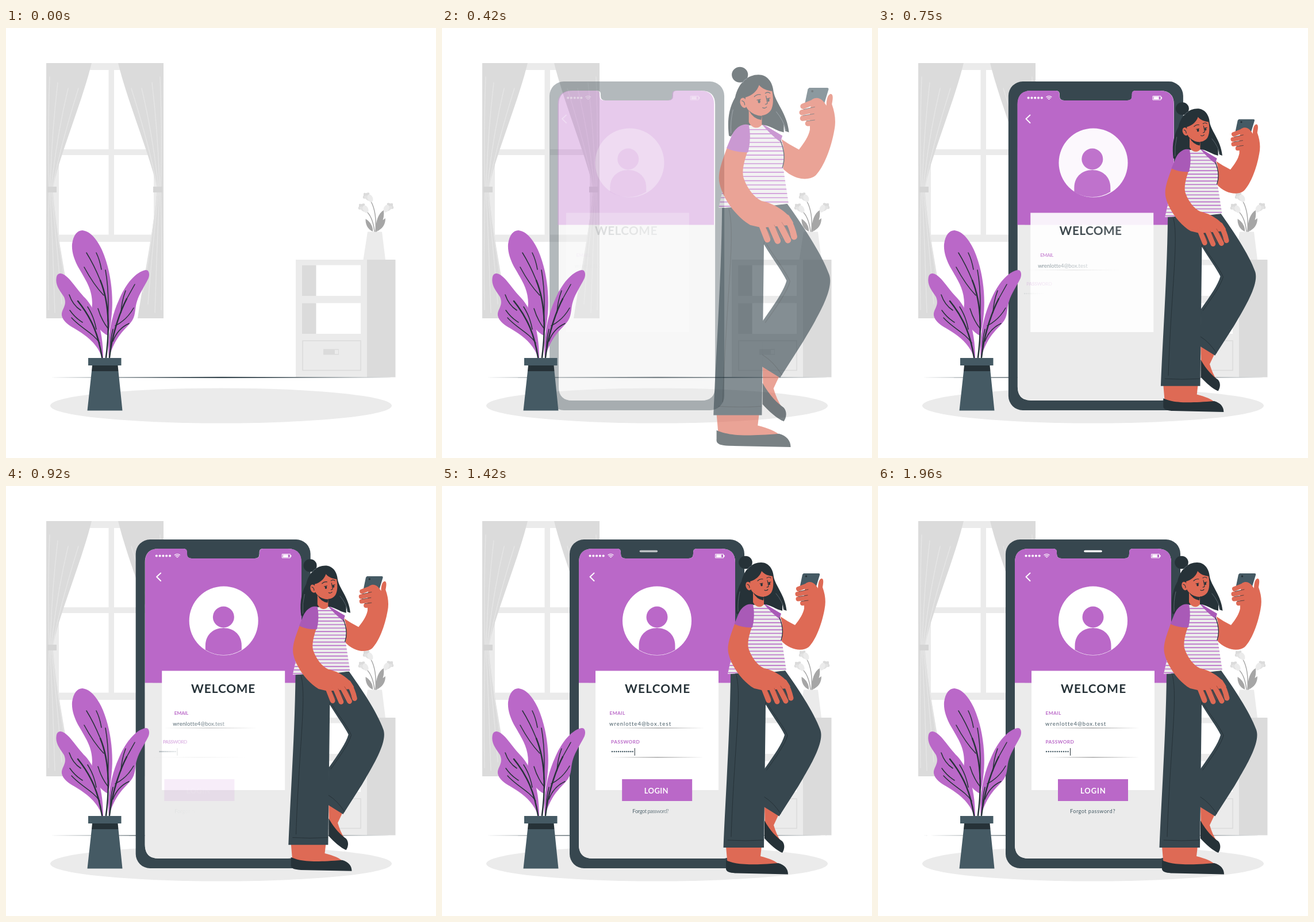
An HTML page that plays this animation: 748x748 px, repeating every 2000 ms.

```html
<!DOCTYPE html>
<html lang="en">
<head>
<meta charset="utf-8">
<title>Login illustration</title>
<style>
html, body { margin: 0; width: 100%; height: 100%; overflow: hidden; background: #fff; }
svg { display: block; width: 100vw; height: 100vh; }
text { font-family: Lato, "Open Sans", sans-serif; white-space: pre; }
.line { fill: none; stroke-linecap: round; stroke-linejoin: round; }
</style>
</head>
<body>
<svg id="stage" viewBox="0 0 748 748">
  <defs>
    <g id="curtain">
      <path fill="#dbdbdb" d="M70 61H149C132 130 92 225 82 276V286C86 340 98 400 115 505H70Z"/>
      <path class="line" stroke="#e6e6e6" stroke-width="1.3" d="M76 85Q72 190 75 276M90 95Q79 190 77 276M108 105Q88 190 79 276M126 105Q96 200 81 276M75 286Q72 390 74 490M77 286Q82 390 85 495M79 286Q90 390 97 480M81 286Q90 370 106 460"/>
      <rect x="72" y="276" width="16" height="10" fill="#d5d5d5"/>
    </g>
    <g id="bloom">
      <ellipse cx="-5" cy="-1" rx="3.5" ry="7" transform="rotate(50)" fill="#dbdbdb"/>
      <ellipse cx="0" cy="-3" rx="3.5" ry="8" transform="rotate(-35)" fill="#dbdbdb"/>
      <ellipse cx="1" cy="1" rx="3.5" ry="8" transform="rotate(-75)" fill="#e3e3e3"/>
      <ellipse cx="4" cy="2" rx="4.5" ry="7" transform="rotate(-25)" fill="#ebebeb"/>
    </g>
    <clipPath id="shirt"><path d="M540 202C526 207 514 222 510 245L503 300 497 327 599 321 591 268C594 250 592 235 588 226L561 206C555 213 546 211 540 202Z"/></clipPath>
  </defs>

  <ellipse cx="374" cy="657" rx="297" ry="30.5" fill="#ebebeb"/>

  <path fill="#ebebeb" fill-rule="evenodd" d="M80 61H266V372H80ZM92 73V211H178.500V73ZM188 73V211H257V73ZM92 221V359.500H178.500V221ZM188 221V359.500H257V221Z"/>
  <use href="#curtain"/>
  <use href="#curtain" transform="matrix(-1 0 0 1 344 0)"/>

  <path fill="#ebebeb" d="M504 403H628V607.500H504ZM629 354.500H654L660 403H621.500Z"/>
  <path fill="#dbdbdb" d="M628 403H677.500V607.500H628Z"/>
  <path fill="#fff" d="M515 412.500H617V466H515ZM515 478.500H617V532H515Z"/>
  <path fill="#dbdbdb" d="M515 412.500H539.500V466H515ZM515 478.500H539.500V532H515ZM552 558.500H579V568.500H552Z"/>
  <path fill="#ebebeb" d="M572 560H578V567H572Z"/>
  <path fill="none" stroke="#dbdbdb" stroke-width="1.500" d="M516 544H617V595.500H516Z"/>

  <path class="line" stroke="#a6a6a6" stroke-width="1.500" d="M643 354Q645 320 635 302M641 354Q638 328 626 318M644 354Q647 325 660 315"/>
  <path fill="#a6a6a6" d="M638 354C629 350 625 341 625.500 332 634 337 639 346 638 354ZM643 354C643 335 648 322 657 317 659 334 652 343 643 354ZM645 354C646 343 653 335 660 331 660 342 655 349 645 354Z"/>
  <use href="#bloom" x="629" y="296"/>
  <use href="#bloom" x="621" y="315"/>
  <use href="#bloom" transform="translate(666 314) scale(-1 1)"/>

  <path fill="#37474f" d="M73 608L376 606.800 677 608 376 609Z"/>

  <g id="phone"></g>

  <g fill="#ba68c8">
    <path d="M177 535C158 525 147 502 150 480 150 455 140 441 128 420 118 403 114 388 115 376 117 360 124 352 133 352 151 354 166 378 174 405 183 433 186 465 184.500 490 183 512 181 522 177 535Z"/>
    <path d="M169 574H167C160 550 140 535 118 522 100 512 95 502 97.500 494 100 486 106 480 101 468 94 457 86 448 87.500 436 88 429 91 427 95 427 108 428 122 454 138 470 156 490 169 525 169 574Z"/>
    <path d="M179 574C175 540 184 500 196 474 208 445 226 424 243 421 250 421 250 430 247.500 436 240 451 232 462 228 475 224 486 226 498 220 508 212 522 192 530 179 574Z"/>
  </g>
  <g class="line" stroke="#263238">
    <path stroke-width="2.500" d="M174 573C180 528 180 478 164 439M167 573C161 535 150 506 125 475M180 573C184 535 198 494 210 471"/>
    <path stroke-width="1.500" d="M164 439Q153 412 140 391M157 391Q163 403 166 420M136 416Q152 446 170 465M173 421Q180 460 177 510M160 488Q166 508 177 522M110 464Q116 482 130 491M111 491Q120 504 133 512M114 504C130 522 151 530 163 548M142 485Q153 502 157 524M210 471L224 446M208 457Q201 476 200 495M222 487Q210 508 190 518M214 514Q194 523 186 545M186 524Q181 545 182 558"/>
  </g>
  <path fill="#455a64" d="M143 574H200.500V587H143ZM149 597H195.500L202.500 665.500H141.500Z"/>
  <path fill="#263238" d="M150 587H194.500L195.500 597H149Z"/>

  <g id="woman">
    <path fill="#455a64" d="M629 152H655Q658 152 657 155L650 178H622L627 154Z"/>
    <circle cx="633.500" cy="157" r="1.700" fill="#263238"/>
    <g fill="#de6a55">
      <path d="M587 226Q600 235 614 242C622 232 628 223 630 213L630 186 633 169C643 163 650 171 654 178 654 169 656 162 660 161 665 161 663 170 662 176 667 190 668 202 665.500 214 661 240 650 268 638 280 628 288 606 287 589 268Z"/>
      <path class="line" stroke="#de6a55" stroke-width="8" d="M620 179L638 172M618.500 188L638 184M619.500 196.500L638 194M627 204L638 203"/>
      <path d="M561 556L585 573 577 590Q582 607 589 617L562 604Z"/>
      <path d="M494 627H556L554 644Q578 650 586 658L497 662Z"/>
    </g>
    <path class="line" stroke="#263238" stroke-width=".7" d="M621 183.500L637 180M620 192.500L636 190M625 200.500L637 199"/>
    <g fill="#263238">
      <path d="M561 582C571 600 582 611 592 618 597 624 596 632 592 638 582 634 570 623 561 613Z"/>
      <path d="M494 651C512 659 535 660 585 656 596 659 602 666 602 675.500L512 673.500C500 673 493 671 494 664Z"/>
    </g>
    <path fill="#37474f" d="M540 328L597 321C617 349 647 393 658 424 666 446 640 488 620 522L586.500 574.500 560 558 561 492C578 468 592 448 596 433 590 420 575 400 563 380L530 350Z"/>
    <path fill="#37474f" d="M502 327L572 323 563 380 560 629H489.500C493 540 501 430 502 327Z"/>
    <path class="line" stroke="#263238" d="M512 329C522 365 508 460 503 610M497 616Q528 618 559 616M567 380C579 400 595 419 601 434 597 449 582 470 565 494M561 541Q577 551 589 570M568 350L563 380"/>

    <g clip-path="url(#shirt)">
      <path fill="#ebebeb" d="M490 195H605V332H490Z"/>
      <path id="stripes" stroke="#b45fc4" stroke-width="1.400"/>
    </g>
    <path fill="#a95ab7" d="M558 203L590 222 587 231Q574 222 558 203Z"/>
    <path class="line" stroke="#263238" stroke-width="1.300" d="M587 229Q596 250 590 268"/>

    <g fill="#263238">
      <ellipse cx="528" cy="133" rx="11.800" ry="11.300"/>
      <path d="M521 166C526 144 540 133 555 133 568 133 576 144 577 158 580 174 597 190 599.500 217L594 215 592 205 592 217 585 215C578 212 570 207 562 206L536 207C526 210 519 216 515 223L512 222C510 205 510 185 521 166Z"/>
    </g>
    <path class="line" stroke="#65727a" stroke-width=".8" d="M538 139Q534 140 532 145M518 184Q514 200 515 218M581 187Q592 200 595 214"/>
    <g fill="#de6a55">
      <path d="M541 180L560 191V206C555 213 545 211 541 202Z"/>
      <ellipse cx="533.500" cy="174" rx="5" ry="7.500" transform="rotate(-18 533.5 174)"/>
      <path d="M536 166C546 163 553 157 556 148 561 154 568 156 575 157 577 168 577 178 573 185 568 192 560 194 551 191 543 188 539 184 537 179Z"/>
    </g>
    <path fill="#263238" d="M541 185Q549 193 560 193L559 199Q547 197 541 185Z"/>
    <g class="line" stroke="#263238" stroke-width="1.100">
      <path d="M549 165Q553 161 558 162M565 160Q569 157 572 160M566 164L568 174Q568 176 565 176M553 170L558 169M567 168L572 167M531 171Q535 172 535 177M561 181Q564 183 567 180"/>
    </g>
    <ellipse cx="556" cy="172" rx="1.800" ry="2.400" fill="#263238"/>
    <ellipse cx="569.500" cy="170" rx="1.600" ry="2.300" fill="#263238"/>

    <g fill="#de6a55">
      <path d="M509 240C501 262 495 278 498.500 292 503 312 522 340 543 352L560 356 600 352 606 349C600 335 580 321 560 317 549 312 538 298 533 282 531 272 534 260 539 245Z"/>
      <path class="line" stroke="#de6a55" stroke-width="9" d="M559 350L568 373M571 347L583 375M583 345L598 374M596 341Q604 354 607 369"/>
    </g>
    <path class="line" stroke="#9a4539" stroke-width=".8" d="M566 356L573 370M578 352L589 371M589 348L602 368"/>
    <path fill="#a95ab7" d="M541 206C530 203 520 212 516 222L508.500 240Q523 247 540 246 545 225 541 206Z"/>
  </g>
</svg>

<script>
const NS = 'http://www.w3.org/2000/svg';
const $ = id => document.getElementById(id);
const phone = $('phone'), woman = $('woman');
const parts = [{ el: phone, at: 0 }];

function slide(at, markup) {
  const el = document.createElementNS(NS, 'g');
  el.innerHTML = markup;
  phone.append(el);
  parts.push({ el, at });
}

// Splits a line of text into letters that slide in one after another.
function word(text, x, y, size, weight, fill, gap, at, step) {
  const style = `y="${y}" font-size="${size}" font-weight="${weight}" fill="${fill}"`;
  const ruler = document.createElementNS(NS, 'g');
  ruler.innerHTML = `<text x="${x}" ${style} letter-spacing="${gap}">${text}</text>`;
  phone.append(ruler);
  const xs = [...text].map((c, i) => ruler.firstChild.getStartPositionOfChar(i).x);
  ruler.remove();
  [...text].forEach((c, i) => slide(at + i * step, `<text x="${xs[i]}" ${style}>${c}</text>`));
}

const underline = (at, y) =>
  slide(at, `<path fill="#a6a6a6" d="M292 ${y}L374 ${y - .7} 456 ${y} 374 ${y + .7}Z"/>`);

const notch = 'M262 109H305Q311 109 311 115V118Q311 126 319 126H429Q437 126 437 118V115Q437 109 443 109H486Q510 109 510 133';
const base = 'V624Q510 648 486 648H262Q238 648 238 624V';
const corner = 'V133Q238 109 262 109Z';
const purple = '#ba68c8', dark = '#263238', slate = '#455a64';

slide(0, `<path fill="#37474f" fill-rule="evenodd" d="M247 93H501A25 25 0 0 1 526 118V640A25 25 0 0 1 501 665H247A25 25 0 0 1 222 640V118A25 25 0 0 1 247 93Z${notch}${base}624${corner}"/>`);
slide(0, `<path fill="#ebebeb" d="M238 342.500H510${base}342.500Z"/>`);
slide(.018, `<path fill="${purple}" d="${notch}V342.500H238${corner}"/>`);
slide(.035, [0, 1, 2, 3, 4].map(i => `<circle cx="${257.5 + i * 5.8}" cy="121.5" r="2" fill="#fff"/>`).join(''));
slide(.045, '<path class="line" stroke="#fff" stroke-width="1.2" d="M289 120Q293.500 116.500 298 120M290.700 122Q293.500 119.800 296.300 122M292.500 123.700H294.500"/>');
slide(.085, '<path fill="none" stroke="#fff" d="M475.500 118.500H489.500V125H475.500Z"/><path fill="#fff" d="M477 119.500H486V124H477ZM490 120H491.500V123.500H490Z"/>');
slide(.14, '<path class="line" stroke="#fff" stroke-width="2" d="M264.500 151.500L257.500 158 264.500 165"/>');
slide(.13, '<circle cx="374" cy="234.500" r="60" fill="#fff"/>');
slide(.16, `<g fill="${purple}"><circle cx="374" cy="228" r="18.500"/>
  <path d="M342.500 285V278C342.500 258 357 247 374 247S405.500 258 405.500 278V285A59.500 59.500 0 0 1 342.500 285Z"/></g>`);
slide(.17, '<path fill="#fff" d="M267 321.500H481V529H267Z"/>');
word('WELCOME', 318, 360, 20.8, 700, dark, 1.2, .18, .011);
word('EMAIL', 291.5, 397.5, 8.3, 700, purple, .4, .27, .01);
word('wrenlotte4@box.test', 291, 416.5, 9.5, 400, slate, 1, .31, .011);
underline(.525, 421);
word('PASSWORD', 291.5, 447.5, 8.3, 700, purple, .4, .53, .01);
for (let i = 0; i < 11; i++)
  slide(.6 + i * .012, `<circle cx="${293 + i * 3.75}" cy="462" r="1.200" fill="${slate}"/>`);
slide(.733, `<path stroke="${dark}" d="M334.500 456V469"/>`);
underline(.745, 472);
slide(.75, `<path fill="${purple}" d="M313 510H435V548H313Z"/>`);
word('LOGIN', 352, 535, 13, 700, '#fff', .9, .76, .0115);
word('Forgot password?', 334, 569, 9.2, 400, slate, .45, .81, .0125);
slide(.97, '<path class="line" stroke="#fff" stroke-width="3.500" d="M360 113.500H388"/>');

let stripes = '';
for (let y = 213; y < 328; y += 6.2) stripes += `M490 ${y}H605`;
$('stripes').setAttribute('d', stripes);

// cubic-bezier(.36, -.01, .5, 1.38)
const curve = (s, a, b) => 3 * (1 - s) ** 2 * s * a + 3 * (1 - s) * s * s * b + s ** 3;
function ease(t) {
  if (t <= 0) return 0;
  if (t >= 1) return 1;
  let lo = 0, hi = 1;
  for (let i = 0; i < 20; i++) {
    const mid = (lo + hi) / 2;
    if (curve(mid, .36, .5) < t) lo = mid; else hi = mid;
  }
  return curve(lo, -.01, 1.38);
}

function pose(el, transform, y) {
  el.setAttribute('transform', transform);
  el.setAttribute('opacity', Math.min(1, Math.max(0, y)));
}

// The motion steps at 24 pictures per second.
function draw(ms) {
  const t = Math.floor((ms % 2000 + 3) / 2000 * 48) % 48 / 24 + .018;
  for (const { el, at } of parts) {
    const y = ease(t - at);
    pose(el, `translate(${45 * (y - 1)} 0)`, y);
  }
  const y = ease(t);
  pose(woman, `translate(578.5 399.5) scale(${1.5 - y / 2}) translate(-578.5 -399.5)`, y);
}

const start = performance.now();
function tick() {
  draw(performance.now() - start);
  requestAnimationFrame(tick);
}
tick();
</script>
</body>
</html>
```
